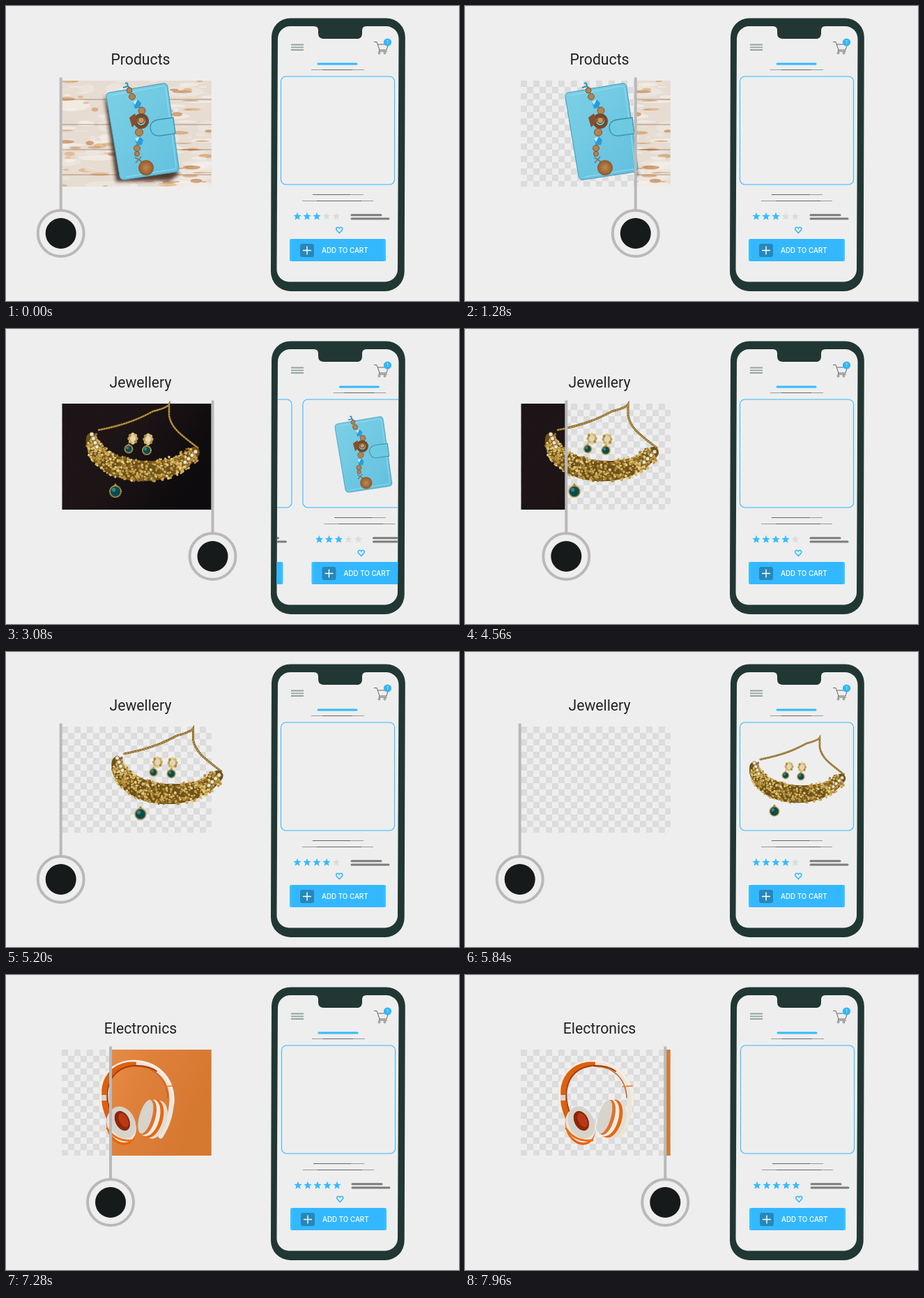
An HTML page that plays this animation: 650x423 px, repeating every 8 s.

```html
<!DOCTYPE html>
<html lang="en">
<head>
<meta charset="utf-8">
<title>Product cutouts</title>
<style>
  html, body { margin: 0; width: 100%; height: 100%; overflow: hidden; background: #eee; }
  svg { display: block; width: 100vw; height: 100vh; }
  .title { font: 21.2px Roboto, sans-serif; fill: #222; text-anchor: middle; }
  .button { font: 500 9.8px Inter, sans-serif; fill: #fff; }
  .badge { font: 6px Inter, sans-serif; fill: #fff; text-anchor: middle; }
</style>
</head>
<body>
<svg id="stage" viewBox="0 0 650 423">
  <defs>
    <pattern id="checker" x="80" y="107" width="18" height="18" patternUnits="userSpaceOnUse">
      <path d="M0 0h9v18h9v-9H0z" fill="#dcdcdc"/>
    </pattern>
    <linearGradient id="cover" x2="1" y2="1">
      <stop stop-color="#7dd0e6"/><stop offset="1" stop-color="#62c0de"/>
    </linearGradient>
    <linearGradient id="night" x2="1" y2=".4">
      <stop stop-color="#1c1518"/><stop offset=".5" stop-color="#1d1416"/><stop offset="1" stop-color="#0d0b0d"/>
    </linearGradient>
    <linearGradient id="amber" x2="1" y2=".3">
      <stop stop-color="#ec9852"/><stop offset=".55" stop-color="#e0813b"/><stop offset="1" stop-color="#d57830"/>
    </linearGradient>
    <radialGradient id="wood"><stop stop-color="#c08a50"/><stop offset="1" stop-color="#8f5a2c"/></radialGradient>
    <filter id="soft" x="-20%" y="-20%" width="140%" height="140%"><feGaussianBlur stdDeviation="2.5"/></filter>
    <clipPath id="wipe"><rect id="wipeRect" y="107" height="152"/></clipPath>
    <clipPath id="screen">
      <path id="screenShape" d="M408 29H442Q448 29 448 35V39Q448 47 456 47H503Q511 47 511 39V35Q511 29 517 29H545A18 18 0 0 1 563.500 47L562 377A18 18 0 0 1 544 395.500H406A18 18 0 0 1 388.500 377L390 47A18 18 0 0 1 408 29Z"/>
    </clipPath>

    <g id="notebook">
      <path d="M149 124L225 111Q231 110 232 116L248 231Q249 237 243 238L171 249Q164 250 163 244L144 131Q143 125 149 124Z" fill="url(#cover)" stroke="#3f9cb8"/>
      <path d="M152 128L224 115Q228 114 229 118L244 229Q245 234 240 234L172 245" fill="none" stroke="#a2e2f0" stroke-width=".8"/>
      <path d="M240 160L218 163Q207 165 207 175Q209 187 221 186L243 183Z" fill="#6ccbe2" stroke="#3b91ab" stroke-width="1.3"/>
      <path d="M171 111q5-2 3 5m-6 1l7-2 4 4" fill="none" stroke="#248fc0" stroke-width="2"/>
      <g id="charm"></g>
      <circle cx="194" cy="165" r="8.5" fill="none" stroke="#7a4724" stroke-width="5"/>
      <circle cx="194" cy="164" r="4.5" fill="#c99558" stroke="#4d2b14"/>
      <path d="M177 160l8-6 4 12-8 8z" fill="#85502b"/>
      <path d="M185 217l10 6m-9 2l8-9m-2 5l4 5" stroke="#73777a" stroke-width="1.7"/>
      <circle cx="201" cy="232" r="11" fill="url(#wood)"/>
    </g>

    <g id="necklace">
      <path id="chain" d="M132 145C175 137 196 126 211 118Q231 113 234 108V124C237 142 250 151 276 171" fill="none" stroke="#6e5218" stroke-width="3"/>
      <path d="M132 145C175 137 196 126 211 118Q231 113 234 108V124C237 142 250 151 276 171" fill="none" stroke="#c7a14c" stroke-width="1.7" stroke-dasharray="3 .7"/>
      <g id="gold"></g>
      <g id="drops"></g>
    </g>

    <g id="headphones" fill="none" stroke-linecap="round">
      <path d="M183 126C213 125 238 146 238 178Q237 208 222 231" stroke="#ece5d9" stroke-width="7"/>
      <path d="M185 131C210 130 231 147 232 176" stroke="#c9622a" stroke-width="1.6"/>
      <path d="M150 209C130 169 142 130 183 127" stroke="#dd600f" stroke-width="8"/>
      <path d="M152 202C137 166 148 134 183 130Q204 129 216 138" stroke="#a83c08" stroke-width="2"/>
      <path d="M136 190V158C140 137 160 123 184 123C224 124 243 158 240 185" stroke="#f7efe2" stroke-width="2.5"/>
      <path d="M226 160l14-1" stroke="#e97524" stroke-width="1.5"/>
      <rect x="137" y="172" width="7" height="8" fill="#d9d4cb"/>
      <g transform="rotate(-27 166 214)">
        <ellipse cx="163" cy="218" rx="20" ry="26" fill="#e8620c"/>
        <ellipse cx="165" cy="215" rx="20" ry="26" fill="#e9e4da"/>
        <ellipse cx="168" cy="212" rx="18" ry="24" fill="#d5d3ca"/>
        <ellipse cx="169" cy="210" rx="10" ry="15" fill="#8f2509"/>
        <ellipse cx="171" cy="210" rx="6" ry="11" fill="#b83a14"/>
      </g>
      <path d="M145 220Q158 240 183 237" stroke="#ee6d12" stroke-width="3"/>
      <g transform="rotate(16 210 206)">
        <ellipse cx="215" cy="206" rx="16" ry="28" fill="#e3ded3"/>
        <ellipse cx="210" cy="206" rx="15" ry="28" fill="#e9660f"/>
        <ellipse cx="206" cy="206" rx="14" ry="27" fill="#f0ece4"/>
        <ellipse cx="203" cy="206" rx="11" ry="26" fill="#e0702a"/>
        <ellipse cx="200" cy="206" rx="9" ry="25" fill="#d6d4cb"/>
      </g>
    </g>
  </defs>

  <rect width="650" height="423" fill="#eee"/>
  <g id="titles"></g>
  <rect x="80" y="107" width="215" height="152" fill="url(#checker)"/>
  <g id="photos" clip-path="url(#wipe)">
    <g>
      <rect x="80" y="107" width="215" height="152" fill="#e6dcd2"/>
      <g id="planks"></g>
      <path d="M141 128L158 252L236 250L250 240L180 200Z" fill="#3c2416" opacity=".85" filter="url(#soft)"/>
    </g>
    <rect x="80" y="107" width="215" height="152" fill="url(#night)"/>
    <rect x="80" y="107" width="215" height="152" fill="url(#amber)"/>
  </g>

  <path d="M408 17.500H545.500A27 27 0 0 1 572.800 45L571.700 381A28 28 0 0 1 544 409H408A28 28 0 0 1 380 381L381 45A27 27 0 0 1 408 17.500Z" fill="#213734"/>
  <use href="#screenShape" fill="#eee"/>
  <g clip-path="url(#screen)" id="cards"></g>
  <path d="M409 55.500h18M409 59.300h18M409 63h18" stroke="#92a5a1" stroke-width="1.8"/>
  <g fill="none" stroke="#666">
    <path d="M528 51.500h4l4 11.500h10l2.500-8h-15M536 63l-1 2h12"/>
    <circle cx="535.500" cy="67.500" r="1.300"/>
    <circle cx="543.500" cy="67.500" r="1.300"/>
  </g>
  <circle cx="547.500" cy="52" r="5.600" fill="#31b6f7"/>
  <text class="badge" x="547.500" y="54.200">1</text>

  <g id="flyers"></g>
  <g id="slider">
    <path d="M0 102.500V293" stroke="#b9b9b9" stroke-width="4"/>
    <circle cy="326" r="33" fill="#eee" stroke="#b9b9b9" stroke-width="4"/>
    <circle cy="326" r="22" fill="#161a1a"/>
  </g>
</svg>
<script>
const LOOP = 8000, BLUE = '#33bcff';
const $ = id => document.getElementById(id);
const list = (n, fn) => Array.from({ length: n }, (_, i) => fn(i)).join('');

let seed = 7;
const rand = (lo = 0, hi = 1) => {
  seed = (seed * 16807) % 2147483647;
  return lo + (hi - lo) * seed / 2147483647;
};
const pick = colors => colors[Math.floor(rand(0, colors.length))];
const dot = (x, y, r, fill, extra = '') => `<circle cx="${x}" cy="${y}" r="${r}" fill="${fill}" ${extra}/>`;

// Products: centre in the photo, shift and scale on the phone, and timing.
const products = [
  { id: 'notebook', title: 'Products', stars: 3, x: 195.5, y: 179.5, dx: 285.5, dy: 0, scale: .785,
    fade: -1000, rise: -1000, fly: 1700, slide: 2892 },
  { id: 'necklace', title: 'Jewellery', stars: 4, x: 195, y: 175, dx: 281, dy: 4.5, scale: .845,
    fade: 2260, rise: 2300, fly: 5046, slide: 6049 },
  { id: 'headphones', title: 'Electronics', stars: 5, x: 188, y: 183, dx: 288, dy: 0, scale: .9,
    fade: 5860, rise: 6093, fly: 9000, slide: 9900 }
];

function drawTextures() {
  const patch = (count, colors, widest, tallest) => list(count, () =>
    `<ellipse cx="${rand(80, 295)}" cy="${rand(107, 259)}" rx="${rand(3, widest)}" ry="${rand(.6, tallest)}" fill="${pick(colors)}" opacity=".6"/>`);
  $('planks').innerHTML = patch(60, ['#f8f4ef', '#efe9e4'], 34, 9)
    + patch(75, ['#cf9255', '#dda56c', '#b9783f'], 15, 3.5)
    + patch(60, ['#f8f4ef', '#efe9e4'], 16, 3)
    + list(4, i => `<path d="M80 ${134 + i * 36}h215" stroke="#8a5a38" stroke-width="1.2" opacity=".6"/>`);

  const beads = [[177, 121, 4, 0], [181, 130, 4.5, 0], [188, 140, 6, 1], [195, 150, 5, 0],
    [191, 181, 5.5, 0], [191, 193, 6, 1], [188, 204, 4.5, 0], [188, 212, 3.5, 0]];
  $('charm').innerHTML = beads.map(([x, y, r, blue]) => blue
    ? `<path d="M${x - r} ${y - 3}l7-3 5 5-2 7-7 1z" fill="#2c9bd8"/><path d="M${x - r} ${y - 3}l7-3-4 8z" fill="#c8ebf5"/>`
    : dot(x, y, r, '#b58250', 'stroke="#71431f" stroke-width=".8"')).join('');

  const curve = (a, b, c, d, u) => {
    const v = 1 - u;
    return v * v * v * a + 3 * v * v * u * b + 3 * v * u * u * c + u * u * u * d;
  };
  const band = (u, off) => [curve(123, 124, 228, 270, u) - off * (1 - 2 * u) * .8, curve(157, 205, 223, 177, u) + off];
  const spread = u => 9 + 7 * Math.sin(Math.PI * u);
  const golds = ['#c6a04a', '#b08a37', '#e4cc83', '#d5b561', '#8a6826'];
  $('gold').innerHTML = list(70, i => dot(...band(i / 69, 0), spread(i / 69) - 1, '#6d511b'))
    + list(620, () => {
      const u = rand();
      return dot(...band(u, rand(-1, 1) * spread(u)), rand(1, 2.1), pick(golds));
    })
    + list(4, i => dot(123 + i * 2.5, 151 + i * 6, 3, '#e9e5da', 'stroke="#92702d"'))
    + list(4, i => dot(272 - i * 5, 176 + i * 5, 3, '#e9e5da', 'stroke="#92702d"'));

  const teal = (x, y, r) => `<path d="M${x} ${y - r * 1.5}L${x + r} ${y - r * .2}A${r} ${r} 0 1 1 ${x - r} ${y - r * .2}Z" fill="#a98336"/>`
    + dot(x, y, r, '#0d4b4b', 'stroke="#c3a04d" stroke-width="2" stroke-dasharray="1.6 .6"')
    + dot(x - r * .3, y - r * .3, r * .35, '#3a8380');
  const flower = (x, y) => list(8, i =>
    dot(x + 5 * Math.cos(i * Math.PI / 4), y + 6 * Math.sin(i * Math.PI / 4), 2.6, golds[i % 4]))
    + dot(x, y, 4.2, '#ddd6c4');
  $('drops').innerHTML = flower(182, 157) + flower(204, 158) + teal(176, 172, 5.5) + teal(202, 174, 6) + teal(157, 233, 8);
}

const star = (x, fill) => {
  const points = list(10, i => {
    const r = i % 2 ? 2.6 : 6, a = i * Math.PI / 5 - Math.PI / 2;
    return `${x + r * Math.cos(a)},${301.8 + r * Math.sin(a)} `;
  });
  return `<polygon points="${points}" fill="${fill}"/>`;
};

const card = p => `<g>
  <path d="M448 83h55" stroke="${BLUE}" stroke-width="3" stroke-linecap="round"/>
  <path d="M438 91.5h76M440 270.5h73M425 279.5h102" stroke="#999"/>
  <path d="M454 91.5h43M440 270.5h54M446 279.5h64" stroke="#666"/>
  <rect x="394.5" y="101" width="163" height="155" rx="7" fill="none" stroke="${BLUE}" stroke-width="1.1"/>
  ${list(5, i => star(418 + i * 14, i < p.stars ? BLUE : '#dcdcdc'))}
  <path d="M496 299.7h42M496 305h53" stroke="#7c7c7c" stroke-width="3" stroke-linecap="round"/>
  <path d="M478.3 325.5l-4-4.3c-2-3 2-5.5 4-2.5c2-3 6-.5 4 2.5z" fill="none" stroke="${BLUE}" stroke-width="1.6"/>
  <rect x="407" y="334" width="138" height="32" rx="2" fill="#36c3ff"/>
  <rect x="410" y="334" width="132" height="32" fill="#33b8ff"/>
  <rect x="422" y="341" width="20" height="19" rx="3" fill="#2787b8"/>
  <path d="M426 350.5h12M432 344.5v12" stroke="#fff" stroke-width="1.4"/>
  <text class="button" x="453" y="354.2">ADD TO CART</text>
  <use href="#${p.id}" transform="${place(p, 1)}"/>
</g>`;

const place = (p, k) =>
  `translate(${p.x + p.dx * k} ${p.y + p.dy * k}) scale(${1 - (1 - p.scale) * k}) translate(${-p.x} ${-p.y})`;

const smooth = x => x * x * (3 - 2 * x);
const easeOut = x => 1 - (1 - x) ** 1.48;
const ramp = (t, start, time, ease = smooth) => ease(Math.min(1, Math.max(0, (t - start) / time)));

drawTextures();
$('titles').innerHTML = products.map(p => `<text class="title" x="193" y="84">${p.title}</text>`).join('');
$('flyers').innerHTML = products.map(p => `<use href="#${p.id}"/>`).join('');
$('cards').innerHTML = products.map(card).join('');

function draw(t) {
  const x = 78.7 + 217.8 * (ramp(t, 610, 1080, easeOut) - ramp(t, 4010, 1000, easeOut) + ramp(t, 6753, 1379));
  $('slider').setAttribute('transform', `translate(${x} 0)`);

  // The second photo is wiped from the right, the others from the left.
  const fromRight = t >= products[1].fade && t < products[2].fade;
  const left = fromRight ? 80.5 : Math.max(80.5, x);
  const right = fromRight ? Math.min(294.7, x) : 294.7;
  $('wipeRect').setAttribute('x', left);
  $('wipeRect').setAttribute('width', Math.max(0, right - left));

  const first = ramp(t, products[0].slide, 708), second = ramp(t, products[1].slide, 708);
  const shifts = [179 * first, -179 * (1 - first) + 188 * second, -188 + 189 * second];

  products.forEach((p, i) => {
    const shown = ramp(t, p.fade, 560), next = products[i + 1];
    const title = $('titles').children[i], flyer = $('flyers').children[i], cardNode = $('cards').children[i];
    title.style.opacity = ramp(t, p.rise, 350) * (next ? 1 - ramp(t, next.rise - 150, 250) : 1);
    title.setAttribute('transform', `translate(0 ${30 * (1 - ramp(t, p.rise, 700))})`);
    $('photos').children[i].style.opacity = t < p.fly + 500 ? shown : 0;
    flyer.style.opacity = t < p.slide ? shown : 0;
    flyer.setAttribute('transform', place(p, ramp(t, p.fly, 700)));
    cardNode.setAttribute('transform', `translate(${shifts[i]} 0)`);
    cardNode.lastElementChild.style.opacity = t < p.slide ? 0 : 1;
  });
}

const start = performance.now();
function tick(now) {
  draw(Math.max(0, now - start) % LOOP);
  requestAnimationFrame(tick);
}
draw(0);
requestAnimationFrame(tick);
</script>
</body>
</html>
```
